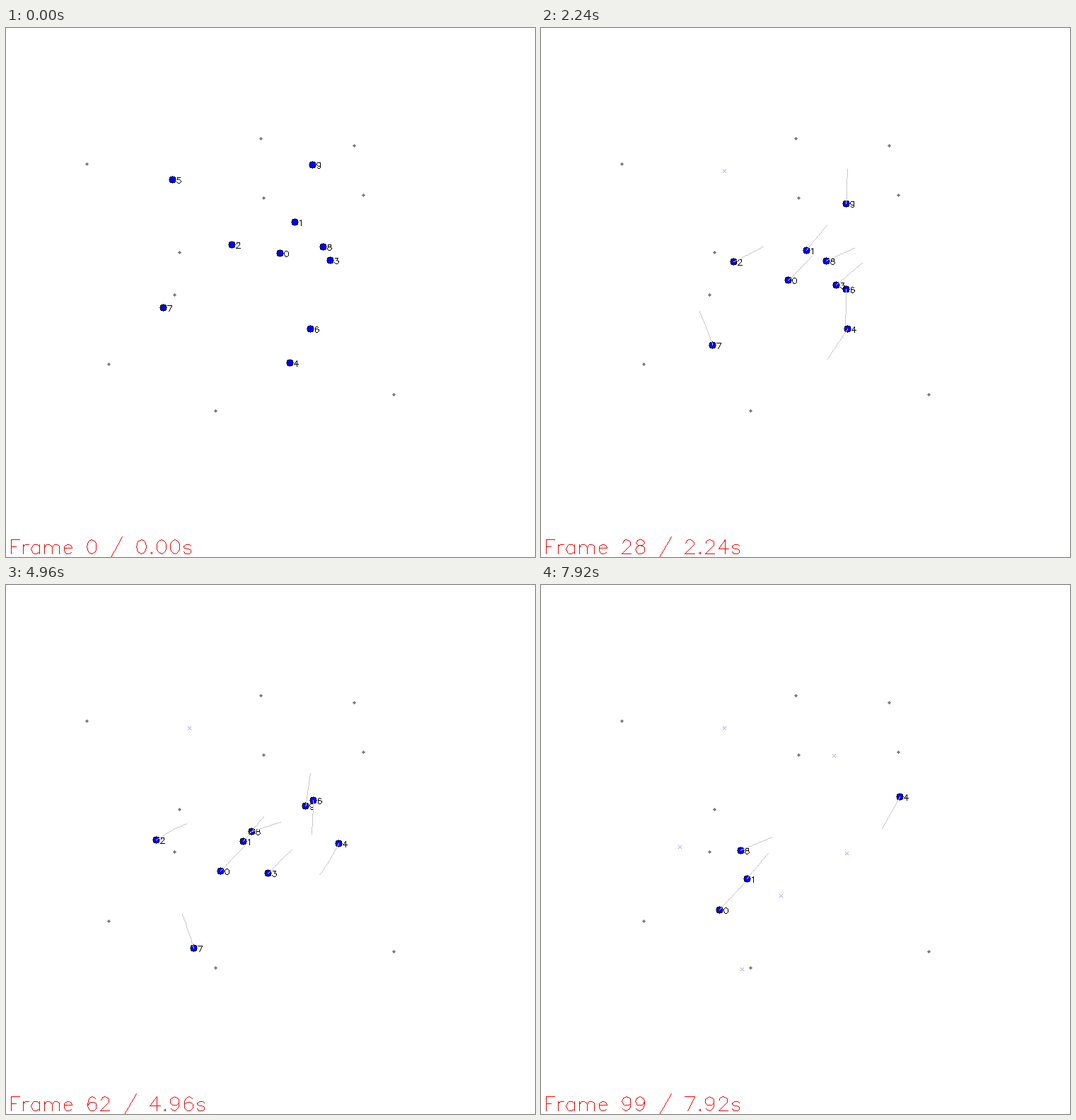
A matplotlib script for the animation above (8 s loop, 748 by 748 pixels).

```python
import numpy as np
import matplotlib.pyplot as plt
from matplotlib.animation import FuncAnimation
from matplotlib.collections import PolyCollection
from matplotlib.transforms import IdentityTransform

SIZE, DPI = 748, 64
FRAMES, INTERVAL = 100, 80
TRAIL = 25


# --- stroke font: baseline 0, cap height 21 ---
def arc(cx, cy, rx, ry, start, end):
    t = np.radians(np.linspace(start, end, 2 + abs(end - start) // 24))
    return list(zip(cx + rx * np.cos(t), cy + ry * np.sin(t)))


def hump(x):
    return arc(x + 5.5, 8.5, 5.5, 5.5, 165, 0) + [(x + 11, 0)]


def half_turn(stroke):
    return [(20 - x, 21 - y) for x, y in stroke]


SIX = arc(11, 10.5, 7, 10.5, 45, 180) + arc(10.5, 6.5, 6.5, 6.5, 180, 540)
DIGITS = [
    [arc(10, 10.5, 7, 10.5, 0, 360)],
    [[(6, 17), (11, 21), (11, 0)]],
    [arc(10, 15.5, 6, 5.5, 180, -30) + [(3, 0), (17, 0)]],
    [[(5, 21), (16, 21)] + arc(10, 6.5, 7, 6.5, 90, -155)],
    [[(13, 0), (13, 21), (3, 7), (18, 7)]],
    [[(15, 21), (5, 21), (4, 12)] + arc(10, 7, 7, 7, 130, -155)],
    [SIX],
    [[(3, 21), (17, 21), (7, 0)]],
    [arc(10, 16.7, 6, 4.3, 0, 360), arc(10, 6.2, 7, 6.2, 0, 360)],
    [half_turn(SIX)],
]
STEM = [(4, 14), (4, 0)]
GLYPHS = {str(n): (20, strokes) for n, strokes in enumerate(DIGITS)}
GLYPHS.update({
    "F": (18, [[(4, 0), (4, 21), (17, 21)], [(4, 11), (12, 11)]]),
    "r": (13, [STEM, arc(10, 8, 6, 6, 180, 70)]),
    "a": (19, [[(15, 14), (15, 0)], arc(9.5, 7, 6.5, 7, 40, 320)]),
    "m": (30, [STEM, hump(4), hump(15)]),
    "e": (18, [[(3, 8), (15, 8)] + arc(9, 7, 6.2, 7, 10, 320)]),
    "s": (17, [arc(8.5, 10.7, 5.5, 3.3, 15, 250) + arc(8.5, 3.7, 5.5, 3.7, 70, -165)]),
    "/": (22, [[(20, 25), (2, -7)]]),
    ".": (10, [arc(5, 1, 1, 1, 0, 360)]),
    " ": (16, []),
})


def text_strokes(text, x, y, scale):
    placed = []
    for char in text:
        advance, strokes = GLYPHS[char]
        placed += [np.array(s) * (scale, -scale) + (x, y) for s in strokes]
        x += advance * scale
    return placed


def pixels(strokes):
    """Whole pixels along one-pixel-wide polylines."""
    found = set()
    for stroke in strokes:
        points = np.rint(stroke).astype(int)
        for a, b in zip(points, points[1:]):
            line = np.linspace(a, b, abs(b - a).max() + 1)
            found.update(map(tuple, np.floor(line + 0.5).astype(int).tolist()))
    return sorted(found)


# --- walkers: key points are evenly spaced over the lifetime ---
class Walker:
    def __init__(self, *points, life=FRAMES - 1):
        xs, ys = np.array(points).T
        steps = np.arange(FRAMES)
        keys = np.linspace(0, life, len(points))
        self.path = np.floor(np.column_stack(
            [np.interp(steps, keys, xs), np.interp(steps, keys, ys)]))
        self.end = life if life < FRAMES - 1 else FRAMES


walkers = [
    Walker((387.5, 318.5), (321, 386), (252, 459.5)),
    Walker((408, 274.5), (350, 345), (291.5, 415)),
    Walker((319.5, 306.5), (280, 327), (235, 346), (196.4, 370.5), life=72),
    Walker((458.5, 328.5), (397, 381), (339.6, 439.6), life=85),
    Walker((401.5, 473.5), (458, 388.3), (507.5, 299.5)),
    Walker((235, 214.5), (259.8, 202.8), life=15),
    Walker((430.5, 425), (432, 362.5), (435, 302), (414.2, 241.2), life=95),
    Walker((222, 395), (233, 422), (244.5, 452), (254.7, 480.5),
           (264.2, 509.5), (272, 540), (284.2, 543.3), life=90),
    Walker((448, 309), (395, 333), (341, 350.7), (282, 375)),
    Walker((433.5, 193.5), (431.5, 258), (423, 319), (432, 379.6), life=98),
]
food = [(114, 192), (360, 156), (492, 166), (364, 240), (505, 236),
        (245, 317), (238, 377), (145, 475), (296, 541), (548, 518)]

fig = plt.figure(figsize=(SIZE / DPI, SIZE / DPI), dpi=DPI, facecolor="white")
ax = fig.add_axes([0, 0, 1, 1])
ax.set_xlim(-0.5, SIZE - 0.5)
ax.set_ylim(SIZE - 0.5, -0.5)
ax.axis("off")


def stepped_disc(half_widths):
    """Pixel outline of a disc; half widths run from the middle row outwards."""
    right = []
    for row, half in enumerate(half_widths):
        right += [(half + 0.5, max(row - 0.5, 0)), (half + 0.5, row + 0.5)]
    top = right + [(-x, y) for x, y in reversed(right)]
    return top + [(-x, -y) for x, y in top]


def add_stamps(half_widths, color, zorder):
    stamps = PolyCollection([stepped_disc(half_widths)], facecolors=[color],
                            edgecolors="none", zorder=zorder, offsets=[(0, 0)],
                            offset_transform=ax.transData,
                            transform=IdentityTransform())
    stamps.set_snap(False)
    ax.add_collection(stamps, autolim=False)
    return stamps


def place(stamps, points):
    stamps.set_visible(len(points) > 0)
    if len(points):
        stamps.set_offsets(points)


place(add_stamps([2, 1, 0], "#808080", 1), food)
crosses = add_stamps([0], "#9a9af0", 2)
rims = add_stamps([5, 4, 4, 4, 3, 0], "black", 3)
cores = add_stamps([4, 3, 3, 3, 0], "#0000ff", 4)
labels = add_stamps([0], "black", 5)
trails = add_stamps([0], "#c8c8c8", 6)
caption = add_stamps([0], "#ff0000", 7)


def update(frame):
    dots, names, tails, marks = [], [], [], []
    for number, walker in enumerate(walkers):
        if frame >= walker.end:
            x, y = walker.path[walker.end]
            marks += [[(x - 2, y - 2), (x + 2, y + 2)],
                      [(x - 2, y + 2), (x + 2, y - 2)]]
            continue
        x, y = walker.path[frame]
        dots.append((x, y))
        names += text_strokes(str(number), x + 5, y + 5, 0.4)
        tails.append(walker.path[max(frame - TRAIL, 0):frame + 1])
    place(rims, dots)
    place(cores, dots)
    place(labels, pixels(names))
    place(trails, pixels(tails))
    place(crosses, pixels(marks))
    seconds = frame * INTERVAL / 1000
    place(caption, pixels(
        text_strokes(f"Frame {frame} / {seconds:.2f}s", 3, 743, 0.95)))
    return rims, cores, labels, trails, crosses, caption


anim = FuncAnimation(fig, update, frames=FRAMES, interval=INTERVAL, repeat=True)
plt.show()
```
